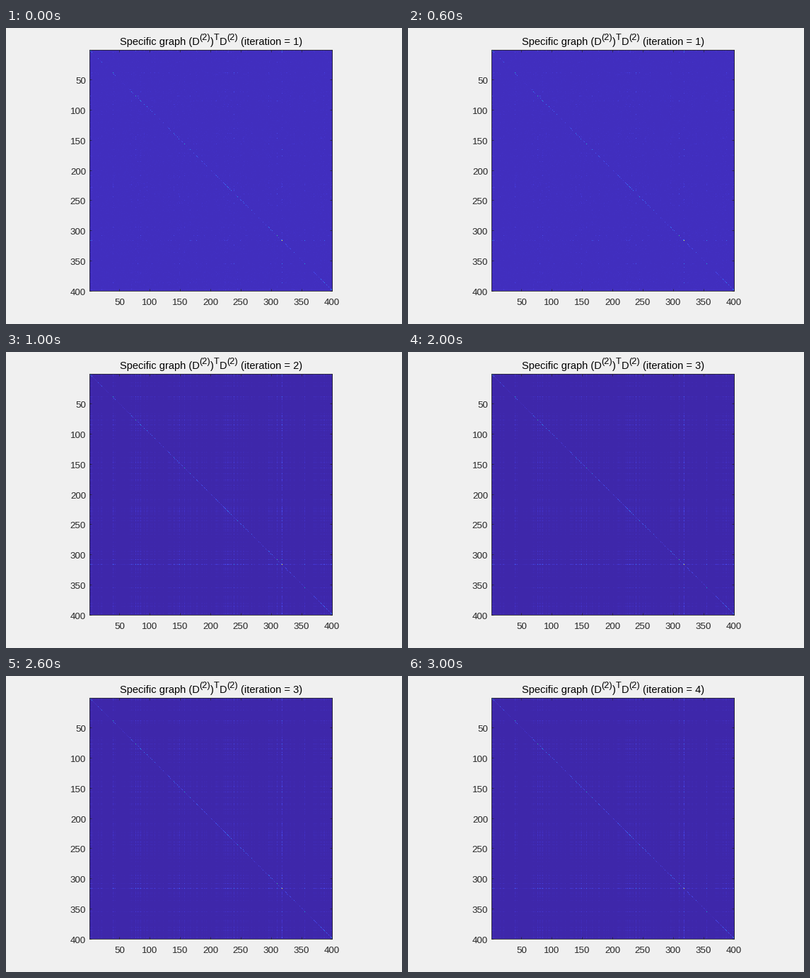
These frames come from a looping animation (560 by 420 pixels, 4000 ms). A matplotlib script:

```python
import matplotlib.pyplot as plt
import numpy as np
from matplotlib.animation import FuncAnimation
from matplotlib.colors import LinearSegmentedColormap
from matplotlib.transforms import ScaledTranslation

W, H, DPI = 560, 420, 100
PT = 72 / DPI
N = 400
INK = "#262626"
LEFT, TOP, RIGHT, BOTTOM = 118, 31, 461, 373
plt.rcParams["font.family"] = "Liberation Sans"

PARULA = LinearSegmentedColormap.from_list("parula_like", [
    (0, "#3e26a8"), (.0625, "#4537d5"), (.125, "#4852f4"), (.25, "#2d87f7"),
    (.375, "#12b1d6"), (.5, "#37c897"), (.75, "#dbbd29"), (1, "#f9fb15")])

# Nodes with the strongest links to all others
HUBS = {39: .4, 77: .45, 238: .6, 309: .5, 317: 1, 355: .38}


def build_graphs():
    """Sparse links first, then ever fainter dense outer products."""
    rng = np.random.default_rng(8)
    node = np.arange(1, N + 1)
    activity = .7 + .3 * np.cos(2 * np.pi * node / 78)
    weight = activity * (.03 + .38 * rng.random(N) ** 4)
    for hub, value in HUBS.items():
        weight[hub - 1] = value

    links = .5 * np.outer(weight, weight)
    mask = np.triu(rng.random((N, N)) < .14)
    sparse = np.where(mask | mask.T, 1.1 * links, 0)

    graphs = [.035 + sparse] + [.004 + gain * links for gain in (1, .92, .9)]
    for graph in graphs:
        np.fill_diagonal(graph, np.maximum(weight, graph.diagonal()))
    return graphs


def draw_axes(fig, data):
    ax = fig.add_axes([LEFT / W, 1 - BOTTOM / H,
                       (RIGHT - LEFT) / W, (BOTTOM - TOP) / H])
    image = ax.imshow(data, cmap=PARULA, vmin=0, vmax=1, aspect="auto",
                      interpolation="nearest", extent=(.5, N + .5, N + .5, .5))
    ticks = range(50, N + 1, 50)
    ax.set_xticks(ticks)
    ax.set_yticks(ticks)
    ax.tick_params(direction="in", top=True, right=True, length=3.4 * PT,
                   width=.7 * PT, color=INK, labelcolor=INK,
                   labelsize=13.33 * PT)
    ax.tick_params(axis="x", pad=10.8 * PT)
    ax.tick_params(axis="y", pad=5 * PT)
    lower = ScaledTranslation(0, -1.5 / DPI, fig.dpi_scale_trans)
    for text in ax.get_yticklabels():
        text.set_transform(text.get_transform() + lower)
    for spine in ax.spines.values():
        spine.set(color=INK, linewidth=.8 * PT)
    return image


def draw_title(fig):
    def write(x, text, raised=False):
        size, baseline = (12.8, 17) if raised else (14.67, 24)
        return fig.text(x / W, 1 - baseline / H, text, fontsize=size * PT,
                        va="baseline", color="black")

    write(161, "Specific graph (D")
    write(273.5, "(2)", raised=True)
    write(289.1, ")")
    write(294, "T", raised=True)
    write(301.8, "D")
    write(312.4, "(2)", raised=True)
    return write(332.1, "")


graphs = build_graphs()
fig = plt.figure(figsize=(W / DPI, H / DPI), dpi=DPI, facecolor="#f0f0f0")
image = draw_axes(fig, graphs[0])
counter = draw_title(fig)


def update(frame):
    image.set_data(graphs[frame])
    counter.set_text(f"(iteration = {frame + 1})")
    return image, counter


anim = FuncAnimation(fig, update, frames=len(graphs), interval=1000,
                     repeat=True, repeat_delay=0)
plt.show()
```
